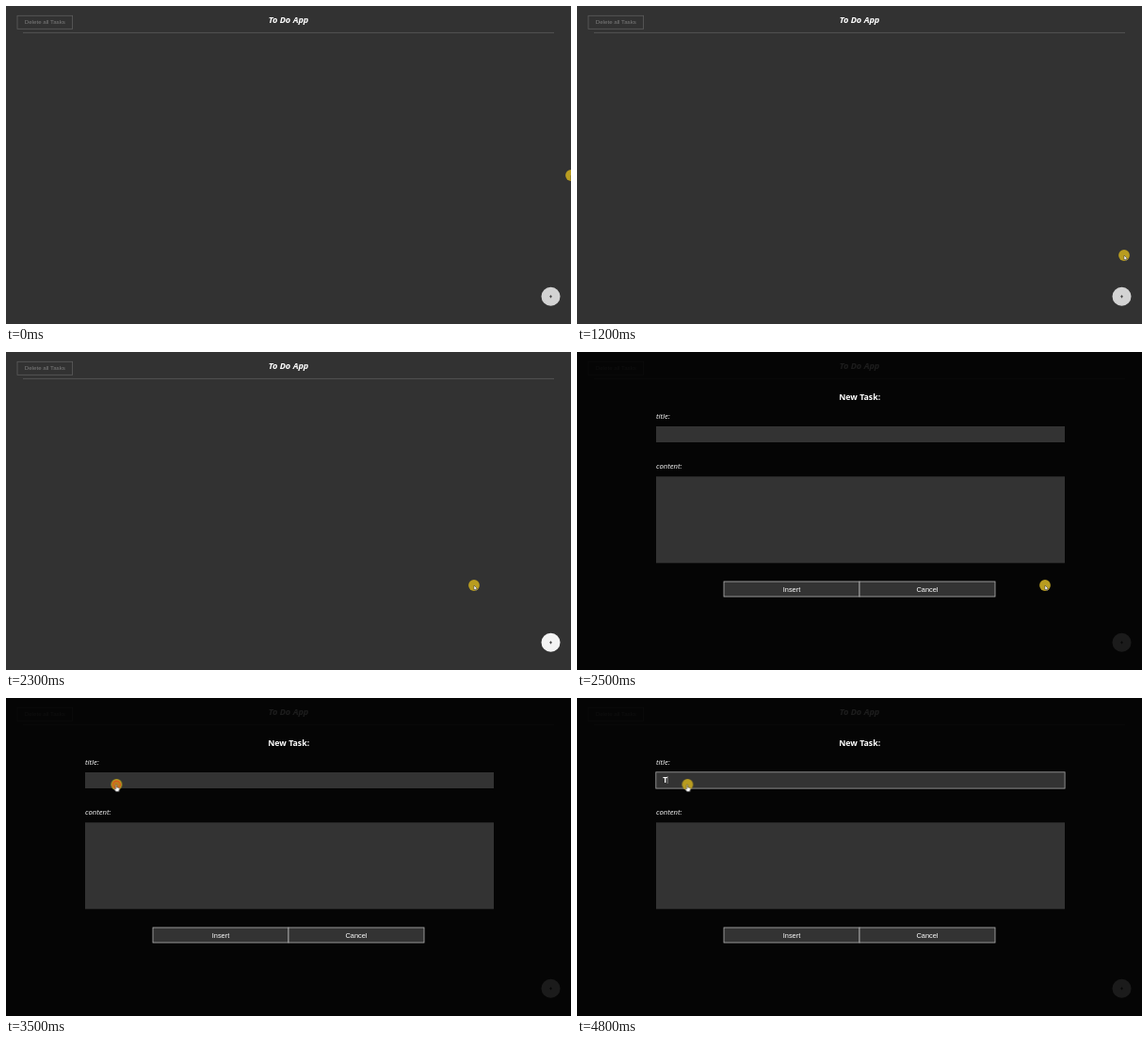
An HTML page that plays this animation: 600x338 px, repeating every 5000 ms.

```html
<!DOCTYPE html>
<html lang="en">
<head>
<meta charset="utf-8">
<title>To Do App</title>
<style>
  html, body { margin: 0; width: 100%; height: 100%; overflow: hidden; background: #323232; }
  svg { display: block; width: 100%; height: 100%; }
  text { font-family: "Open Sans", "Noto Sans", sans-serif; fill: #fff; }
  .arial { font-family: "Liberation Sans", Arial, sans-serif; }
  .middle { text-anchor: middle; }
  .bold { font-weight: 700; }
  .italic { font-style: italic; }
  .field { fill: #333; }
  .button { fill: #333; stroke: #b4b4b4; stroke-width: .8; }

  /* One loop is 5 s, so 2% is one 100 ms step. */
  .add, .modal, .focus, .caret, .typed, .pointer, .halo, .arrow, .hand, .ring {
    animation: 5s step-end -4ms infinite;
  }
  .add { fill: #d3d3d3; animation-name: brighten; }
  .modal { animation-name: open; }
  .focus { fill: none; stroke: #aaa; stroke-width: .8; animation-name: focus; }
  .caret { animation-name: caret; }
  .typed { animation-name: type; }
  .pointer { animation-name: travel; }
  .halo { fill: #b89c20; animation-name: halo; }
  .arrow { animation-name: arrow; }
  .hand { animation-name: hand; }
  .ring { fill: #c8501c66; stroke: #dc5a1c; stroke-width: 1.2; animation-name: click; }
  .arrow, .hand { fill: #fff; stroke: #333; stroke-width: .5; stroke-linejoin: round; }

  @keyframes brighten { 0% { fill: #d3d3d3 } 46%, 100% { fill: #f3f3f3 } }
  @keyframes open { 0% { opacity: 0 } 50%, 100% { opacity: 1 } }
  @keyframes focus {
    0% { opacity: 0 }
    78% { opacity: 0; animation-timing-function: steps(4, end) }
    86%, 100% { opacity: 1 }
  }
  @keyframes caret {
    0% { opacity: 0; transform: none }
    90% { opacity: .8; transform: none }
    96%, 100% { opacity: .8; transform: translateX(4.7px) }
  }
  @keyframes type { 0% { opacity: 0 } 96%, 100% { opacity: 1 } }
  @keyframes travel {
    0% { transform: translate(600px, 180px); animation-timing-function: steps(3, end) }
    6% { transform: translate(601px, 180px) }
    8% { transform: translate(601px, 180px); animation-timing-function: steps(5, end) }
    18% { transform: translate(592px, 179px) }
    20% { transform: translate(587px, 203px) }
    22% { transform: translate(585px, 225px) }
    24% { transform: translate(581px, 265px) }
    26% { transform: translate(578px, 296px) }
    28% { transform: translate(577px, 309px) }
    36% { transform: translate(570px, 304px) }
    38% { transform: translate(548px, 288px) }
    40% { transform: translate(521px, 267px) }
    42% { transform: translate(503px, 253px) }
    44% { transform: translate(497px, 248px) }
    54% { transform: translate(485px, 243px) }
    56% { transform: translate(430px, 221px) }
    58% { transform: translate(320px, 175px) }
    60% { transform: translate(200px, 126px) }
    62% { transform: translate(135px, 100px) }
    64%, 100% { transform: translate(117.4px, 92px) }
  }
  @keyframes halo {
    0% { fill: #b89c20 }
    28% { fill: #ecd27a }
    30% { fill: #efd290 }
    34% { fill: #ecd27a }
    36%, 100% { fill: #b89c20 }
  }
  @keyframes arrow { 0% { opacity: 1 } 28% { opacity: 0 } 36% { opacity: 1 } 62%, 100% { opacity: 0 } }
  @keyframes hand { 0% { opacity: 0 } 28% { opacity: 1 } 36% { opacity: 0 } 62%, 100% { opacity: 1 } }
  @keyframes click {
    0% { opacity: 0; transform: scale(.3) }
    66% { opacity: .6; transform: scale(.4); animation-timing-function: steps(2, end) }
    70% { opacity: 1; transform: scale(1); animation-timing-function: steps(3, end) }
    76%, 100% { opacity: 0; transform: scale(1.7) }
  }
</style>
</head>
<body>
<svg viewBox="0 0 600 338">
  <rect width="600" height="338" fill="#323232"/>
  <rect x="12" y="10.3" width="58.6" height="14" fill="none" stroke="#5c5c5c" stroke-width=".8"/>
  <text class="arial middle" x="41.3" y="19.3" font-size="6.2" style="fill:#7c7c7c">Delete all Tasks</text>
  <text class="bold italic middle" x="300" y="18" font-size="9.2">To Do App</text>
  <path d="M18 28.4H582" stroke="#5c5c5c" stroke-width=".8"/>
  <circle class="add" cx="578.5" cy="308.8" r="10"/>
  <path d="M577 308.8h3M578.5 307.3v3" stroke="#333" stroke-width=".8"/>

  <g class="modal">
    <rect width="600" height="338" opacity=".89"/>
    <text class="bold middle" x="300.2" y="51.4" font-size="8.8">New Task:</text>
    <text class="italic" x="84" y="71" font-size="7.7">title:</text>
    <rect class="field" x="84" y="79" width="434" height="17"/>
    <rect class="focus" x="83.8" y="78.8" width="434.3" height="17.3"/>
    <text class="typed bold" x="91.2" y="90" font-size="8.4">T</text>
    <path class="caret" d="M91.4 83v8" stroke="#ddd" stroke-width=".6"/>
    <text class="italic" x="84" y="124.4" font-size="7.7">content:</text>
    <rect class="field" x="84" y="132.3" width="434" height="92"/>
    <rect class="button" x="156" y="244" width="144" height="16"/>
    <rect class="button" x="300" y="244" width="144" height="16"/>
    <text class="arial middle" x="228" y="254.5" font-size="7.4">Insert</text>
    <text class="arial middle" x="372" y="254.5" font-size="7.4">Cancel</text>
  </g>

  <g class="pointer">
    <circle class="halo" r="5.9"/>
    <circle class="ring" r="3.9"/>
    <path class="arrow" d="M0 0V5L1.2 4 2 5.8 2.8 5.4 2.1 3.7H3.6Z"/>
    <path class="hand" d="M-.8 .4Q-.3-.4.2.4V3L2.6 3.5Q3.3 3.8 3.1 5L2.4 7.4H-.8L-2.5 4.8Q-2.2 3.8-.8 4.8Z"/>
  </g>
</svg>
</body>
</html>
```
